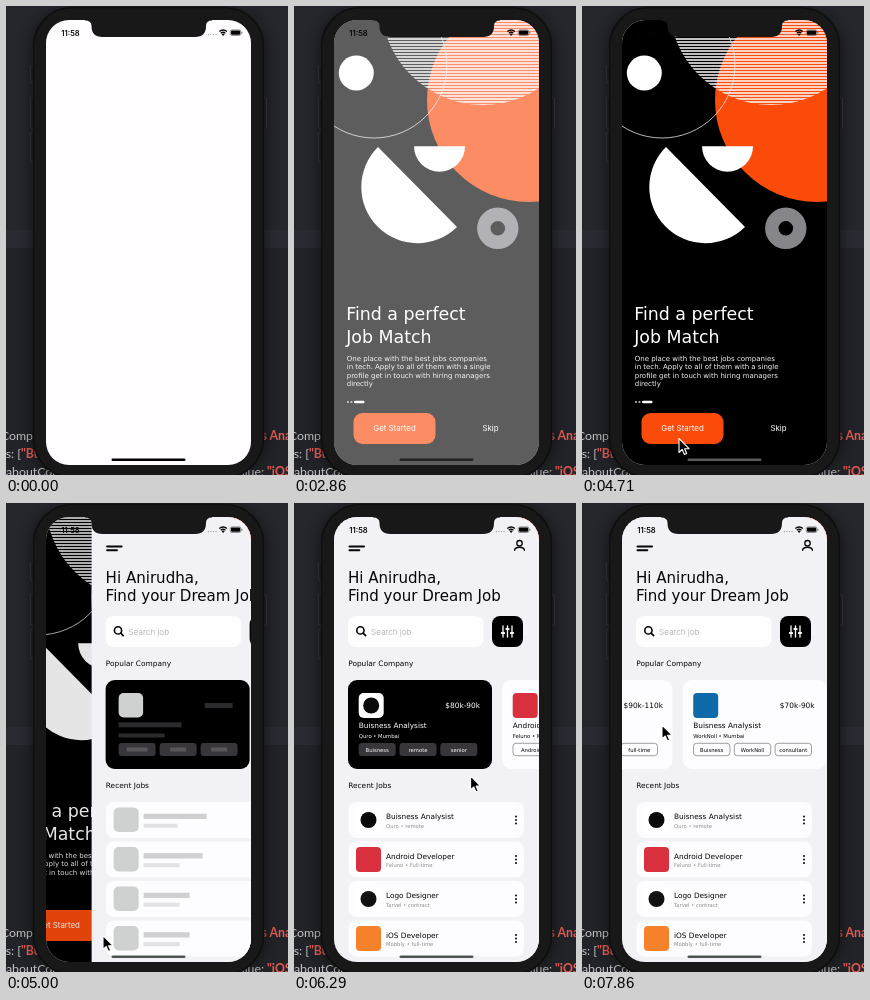
These frames come from a looping animation (282x469 px, 8 s). An HTML page:

```html
<!DOCTYPE html>
<html lang="en">
<head>
<meta charset="utf-8">
<title>Job finder app</title>
<style>
  html, body { margin: 0; width: 100%; height: 100%; overflow: hidden; background: #232429; }
  svg { display: block; width: 100%; height: 100%; }
  text { font-family: "DejaVu Sans", Verdana, sans-serif; white-space: pre; }
  .ui { font-family: Inter, Roboto, sans-serif; }
  .code { font-family: Lato, "Open Sans", sans-serif; }
</style>
</head>
<body>
<svg id="stage" viewBox="0 0 282 469" xmlns="http://www.w3.org/2000/svg"></svg>
<script>
const ORANGE = '#fa4b0b', INK = '#050505', PAPER = '#f2f1f6';

const rect = (x, y, w, h, r, fill, extra = '') =>
  `<rect x="${x}" y="${y}" width="${w}" height="${h}" rx="${r}" fill="${fill}" ${extra}/>`;
const circle = (x, y, r, fill, extra = '') =>
  `<circle cx="${x}" cy="${y}" r="${r}" fill="${fill}" ${extra}/>`;
const text = (x, y, size, fill, str, extra = '') =>
  `<text x="${x}" y="${y}" font-size="${size}" fill="${fill}" ${extra}>${str}</text>`;
const path = (d, stroke, width, extra = '') =>
  `<path d="${d}" fill="none" stroke="${stroke}" stroke-width="${width}" ${extra}/>`;
const range = n => [...Array(n).keys()];
const MID = 'text-anchor="middle"', UI = 'class="ui" ', ROUND = 'stroke-linecap="round"';

// Company badges: [colour, has a white tile]
const badges = {
  Quro: ['#0a0a0a', true], Feluno: ['#d9303e', false], Tarvel: ['#111', true],
  Mobbly: ['#f5822a', false], WorkNoll: ['#1069a9', false]
};
const badge = (x, y, name) => {
  const [color, tile] = badges[name];
  return tile ? rect(x, y, 25, 25, 5, '#fff') + circle(x + 12.5, y + 12.5, 8, color)
              : rect(x, y, 25, 25, 4, color);
};

const cards = [
  { dark: true, title: 'Buisness Analysist', firm: 'Quro', pay: '$80k-90k', tags: ['Buisness', 'remote', 'senior'] },
  { title: 'Android Developer', firm: 'Feluno', pay: '$90k-120k', tags: ['Android', 'Kotlin', 'full-time'] },
  { dark: true, title: 'Logo Designer', firm: 'Tarvel', pay: '$70k-80k', tags: ['Designer', 'UI/UX', 'Logo'] },
  { title: 'iOS Developer', firm: 'Mobbly', pay: '$90k-110k', tags: ['iOS', 'Swift', 'full-time'] },
  { title: 'Buisness Analysist', firm: 'WorkNoll', pay: '$70k-90k', tags: ['Buisness', 'WorkNoll', 'consultant'] }
];
const jobs = [
  ['Buisness Analysist', 'Quro', 'remote', 63, 34],
  ['Android Developer', 'Feluno', 'Full-time', 59, 36],
  ['Logo Designer', 'Tarvel', 'contract', 46, 36],
  ['iOS Developer', 'Mobbly', 'full-time', 46, 36]
];

const tagBox = (x, dark) => dark
  ? rect(x, 240, 37, 13, 3, '#38363a')
  : rect(x + .3, 240.3, 36.4, 12.4, 3, 'none', 'stroke="#77777a" stroke-width=".7"');

function cardSvg(c, i) {
  const x = 54 + i * 154, ink = c.dark ? '#fff' : INK;
  const bar = c.dark ? '#2b2a2d' : '#d2d2d3', tagBar = c.dark ? '#59575b' : '#d2d2d3';
  const blank = rect(x + 13, 190, 24.5, 24.5, 5, '#cfd0d0') +
    rect(x + 99, 200, 28, 5, 0, bar) + rect(x + 13, 219.3, 63, 5, 0, bar) +
    rect(x + 13, 230.5, 46, 4, 0, bar) +
    [21, 16, 16].map((w, k) => tagBox(x + 13 + k * 41, c.dark) +
      rect(x + 31.5 + k * 41 - w / 2, 244.5, w, 4, 0, tagBar)).join('');
  const full = badge(x + 10.7, 190, c.firm) +
    text(x + 114.7, 205.3, 7.4, ink, c.pay, MID) +
    text(x + 10.8, 224.6, 7.35, ink, c.title) +
    text(x + 10.8, 234.6, 5.3, ink, c.firm + ' • Mumbai') +
    c.tags.map((s, k) => tagBox(x + 10.7 + k * 40.8, c.dark) +
      text(x + 29.2 + k * 40.8, 248.5, 5.3, ink, s, MID)).join('');
  return rect(x, 177, 144, 89, 9, c.dark ? '#000' : '#fdfcfe') +
    `<g class="blank">${blank}</g><g class="full">${full}</g>`;
}

function jobSvg([title, firm, kind, w1, w2], i) {
  const y = 299 + i * 39.5;
  return rect(54.5, y, 175.5, 36, 8, '#fdfcfe') +
    `<g class="blank">${rect(62, y + 5.5, 25, 24.5, 5, '#cfd0d0')}
     ${rect(92, y + 11.7, w1, 5.3, 0, '#d0d0d1')}${rect(92, y + 21.7, w2, 4, 0, '#e2e2e3')}</g>
     <g class="full">${badge(62, y + 5.5, firm)}${text(92, y + 17, 7.35, INK, title)}
     ${text(92, y + 25.6, 5.25, '#8c8c8f', firm + ' • ' + kind)}</g>` +
    [14.5, 18, 21.5].map(d => circle(222, y + d, 1, INK)).join('');
}

function welcomePage() {
  const stripes = range(30).map(i => `M80 ${12 + i * 3}H246`).join('');
  const body = ['One place with the best jobs companies', 'in tech. Apply to all of them with a single',
    'profile get in touch with hiring managers', 'directly'];
  return rect(40, 14, 205, 446, 0, '#000') +
    circle(235, 94, 102, ORANGE) + path(stripes, '#fff', 1.7, 'clip-path="url(#striped)"') +
    circle(80, 59, 73, 'none', 'stroke="#e4e4e4" stroke-width=".8"') +
    circle(62.3, 67, 17.5, '#fff') +
    `<path d="M84 141A56.2 56.2 0 0 0 163 221Z" fill="#fff"/>
     <path d="M120 140.3A25.5 25.5 0 0 0 171 140.3Z" fill="#fff"/>` +
    circle(203.8, 222.3, 14, 'none', 'stroke="#86868a" stroke-width="13.4"') +
    text(52.2, 314.3, 17.4, '#fff', 'Find a perfect') + text(52.2, 337.3, 17.4, '#fff', 'Job Match') +
    body.map((s, i) => text(52.7, 354.7 + i * 8.45, 7, '#f4f4f4', s)).join('') +
    circle(54, 396, 1.1, '#bbb') + circle(57.5, 396, 1.1, '#bbb') + rect(60, 394.7, 10.5, 2.5, 1.2, '#fff') +
    rect(59.5, 407, 82, 31, 9, ORANGE) +
    text(100.5, 425.4, 7.9, '#fff', 'Get Started', UI + MID) +
    text(196.5, 425.4, 7.9, '#fff', 'Skip', UI + MID);
}

function homePage() {
  const sliders = [[209, 130], [213.5, 126], [218, 130]].map(([x, y]) =>
    path(`M${x} 123V134`, '#fff', 1.3, ROUND) + path(`M${x - 1.2} ${y}h2.4`, '#fff', 1.8, ROUND)).join('');
  return rect(40, 14, 205, 446, 0, PAPER) +
    path('M55.5 43.4H70M55.5 47.2H65.3', INK, 2, ROUND) +
    circle(225.5, 40.2, 2.7, 'none', `stroke="${INK}" stroke-width="1.3"`) +
    path('M220.6 47.4C220.8 43.2 230.2 43.2 230.4 47.4', INK, 1.3, ROUND) +
    text(54, 79.6, 15.05, INK, 'Hi Anirudha,') + text(54, 98, 15.05, INK, 'Find your Dream Job') +
    rect(54, 113, 135.5, 31, 8, '#fffefe') +
    circle(66.4, 127.4, 3.6, 'none', `stroke="${INK}" stroke-width="1.6"`) +
    path('M69.2 130.2L71.6 132.6', INK, 1.8, ROUND) +
    text(77, 131.5, 8, '#b9b9bc', 'Search job', UI) +
    rect(198, 113, 31, 31, 8, '#000') + sliders +
    text(54.2, 163.4, 7.4, INK, 'Popular Company') +
    `<g id="deck">${cards.map(cardSvg).join('')}</g>` +
    text(54.2, 285.4, 7.4, INK, 'Recent Jobs') + jobs.map(jobSvg).join('');
}

function backdrop() {
  const pale = '#c4c4c6', red = '#e25c54', code = 'class="code"';
  const bold = code + ' font-weight="700"', end = code + ' text-anchor="end"';
  return rect(0, 0, 282, 469, 0, '#25262c') + rect(0, 224, 282, 18, 0, '#2a2b32') +
    rect(0, 242, 282, 227, 0, '#222328') +
    text(27, 434, 12.3, pale, 'popularComp', end) +
    text(15, 452, 12.3, pale, 'tags: [', end) + text(15, 452, 12.3, red, '"Buisness"', bold) +
    text(0, 470, 12.3, pale, 'aboutCompany', code) +
    text(255.5, 434, 12.3, red, 's Analysist"', bold) +
    text(258, 470, 12.3, pale, 'value:', end) + text(261, 470, 12.3, red, '"iOS Developer"', bold);
}

function phoneBody() {
  const key = (x, y, h) => rect(x, y, 4, h, 1, '#1b1b1d', 'stroke="#3a3a3e" stroke-width=".6"');
  return rect(26, 3, 233, 468, 40, '#0a0a0c', 'filter="url(#soft)" opacity=".55"') +
    key(24.3, 60, 17) + key(24.3, 91, 31) + key(24.3, 126, 30) + key(256.5, 92, 30) +
    rect(27.5, 1.5, 230, 470, 39, '#181818', 'stroke="#0e0e0e" stroke-width="1.6"');
}

function statusBar() {
  return `<path d="M79 13H206V14.5Q200 14.5 200 20Q200 31 189 31H96.5Q85.5 31 85.5 20Q85.5 14.5 79 14.5Z" fill="#181818"/>` +
    text(55.3, 29.6, 7.6, INK, '11:58', UI + 'font-weight="600"') +
    [202.5, 205, 207.5, 210].map(x => circle(x, 28.6, .7, '#9a9a9c')).join('') +
    path('M213.3 25.6Q217.1 22.3 220.9 25.6M214.8 27.2Q217.1 25.2 219.4 27.2', INK, 1.3) +
    `<path d="M215.6 28.2Q217.1 27 218.6 28.2L217.1 29.9Z" fill="${INK}"/>` +
    rect(224.3, 23.9, 10.6, 5.6, 1.6, 'none', 'stroke="#555" stroke-width=".6"') +
    rect(225, 24.6, 9.2, 4.2, 1, INK) + rect(235.5, 25.7, .8, 2, .4, '#555');
}

const stage = document.getElementById('stage');
stage.innerHTML = `<defs>
    <clipPath id="screen">${rect(40, 14, 205, 445, 23, '#fff')}</clipPath>
    <clipPath id="striped">${circle(189, -3, 102, '#fff')}</clipPath>
    <filter id="soft" x="-20%" y="-20%" width="140%" height="140%"><feGaussianBlur stdDeviation="7"/></filter>
  </defs>
  ${backdrop()}${phoneBody()}
  <g clip-path="url(#screen)">
    ${rect(40, 14, 205, 446, 0, '#fffdff')}
    <g id="welcome">${welcomePage()}${rect(40, 14, 205, 446, 0, '#000', 'id="dim"')}</g>
    <g id="home">${homePage()}</g>
    ${statusBar()}
    ${rect(105.5, 452.4, 74, 2.6, 1.3, '#000', 'id="grip"')}
  </g>
  <path id="cursor" d="M0 0V14L3.2 11L5.4 16L7.7 15L5.6 10.2H10Z" fill="#000" stroke="#fff" stroke-width="1.1" stroke-linejoin="round"/>`;

const el = id => document.getElementById(id);
const [welcome, dim, home, deck, grip, cursor] =
  ['welcome', 'dim', 'home', 'deck', 'grip', 'cursor'].map(el);
const blanks = document.querySelectorAll('.blank'), fulls = document.querySelectorAll('.full');
const clamp = v => Math.min(1, Math.max(0, v));
const move = (node, x, y = 0) => node.setAttribute('transform', `translate(${x.toFixed(2)} ${y.toFixed(2)})`);

const FADE = 2720, PUSH = 4780, LOADED = 6290, DRAG = 6850, RELEASE = 7000;

function pushed(t) {
  const s = Math.max(0, t - PUSH) * .0129;
  return 1 - (1 + s) * Math.exp(-s);
}

// Drag, then glide with friction until the end stop, then a damped bounce.
function scrolled(t) {
  if (t < DRAG) return 0;
  if (t < RELEASE) return 282 * ((t - DRAG) / (RELEASE - DRAG)) ** 1.3;
  const end = 569, hit = -500 * Math.log(1 - (end - 282) / 1000), s = t - RELEASE;
  if (s < hit) return 282 + 1000 * (1 - Math.exp(-s / 500));
  return end + 2 * Math.exp(-hit / 500) * (s - hit) * Math.exp(-.011 * (s - hit));
}

const trail = [[3480, 112, 480], [3800, 97, 432.5], [5600, 97, 432.5], [6600, 200, 226],
  [DRAG, 215, 228], [RELEASE, 10, 229.5], [7250, 10, 229.5], [7750, 80, 222], [8000, 80, 222]];
function pointer(t) {
  const i = trail.findIndex(k => k[0] > t);
  if (i < 1) return [112, 480];
  const [t0, x0, y0] = trail[i - 1], [t1, x1, y1] = trail[i];
  const u = (t - t0) / (t1 - t0), e = u * u * (3 - 2 * u);
  return [x0 + (x1 - x0) * e, y0 + (y1 - y0) * e];
}

function draw(t) {
  const p = pushed(t), loaded = t >= LOADED, fade = clamp((t - FADE) / 359);
  const gray = Math.round(90 * fade);
  welcome.setAttribute('opacity', 1 - (1 - fade) ** 2);
  move(welcome, -61.5 * p);
  dim.setAttribute('opacity', .13 * p);
  home.setAttribute('display', p > 0 ? 'inline' : 'none');
  move(home, 205 * (1 - p));
  move(deck, -scrolled(t));
  blanks.forEach(n => n.setAttribute('display', loaded ? 'none' : 'inline'));
  fulls.forEach(n => n.setAttribute('display', loaded ? 'inline' : 'none'));
  grip.setAttribute('fill', p < .5 ? `rgb(${gray},${gray},${gray})` : '#4e5450');
  move(cursor, ...pointer(t));
}

function tick() {
  draw(performance.now() % 8000);
  requestAnimationFrame(tick);
}
tick();
</script>
</body>
</html>
```
